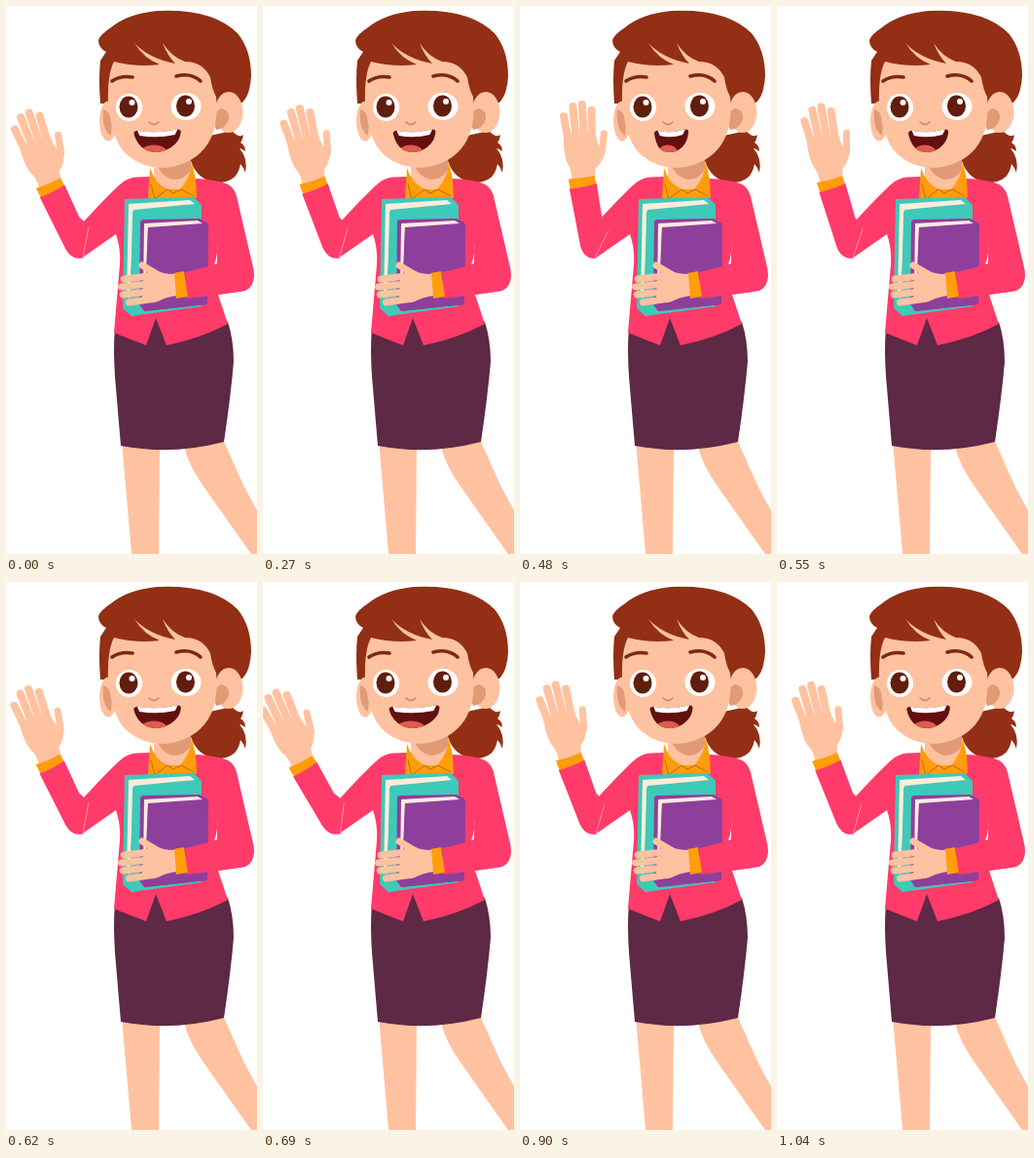
Animation of 258x562 px, one loop 1110 ms. Source, as an HTML page:

```html
<!DOCTYPE html>
<html lang="en">
<head>
<meta charset="utf-8">
<title>Waving teacher</title>
<style>
  html, body { margin: 0; width: 100%; height: 100%; overflow: hidden; background: #fff; }
  svg { display: block; width: 258px; height: 562px; }
  .skin { fill: #ffc2a0; }
  .hair { fill: #922f14; }
  .pink { fill: #ff3b6a; }
  .orange { fill: #ff9d0a; }
  .teal { fill: #3fc9b8; }
  .purple { fill: #8e3f9c; }
  .skirt { fill: #5d2945; }
  .page { fill: #fdecdc; }
  .shade { fill: #e09a75; }
  .dark { fill: #640f10; }
  .line { fill: none; stroke-linecap: round; stroke-linejoin: round; }
  .finger { stroke: #ffc2a0; stroke-width: 7; }
  .fold { stroke: #ff9fb4; stroke-width: .8; }
  .gap { stroke: #e6a07c; stroke-width: .8; }
  .brow { stroke: #7c2812; stroke-width: 3.6; }
</style>
</head>
<body>
<svg viewBox="0 0 258 562">
  <!-- legs and skirt -->
  <path class="skin" d="M119 446L129 562H157L158 450ZM183 452Q188 472 204 494L252 562H258V517Q246 497 238 478L222 442Z"/>
  <path class="skirt" d="M112 330Q110 350 112 380L118 451Q170 461 224 447Q231 400 234 365Q234 342 228 324L154 316Z"/>

  <!-- ponytail, neck -->
  <path class="hair" d="M196 136L232 128Q240 136 244 132Q243 138 241 140Q246 143 246 149Q242 146 240 146Q249 156 246 171Q244 165 241 162Q238 181 218 181Q196 180 189 156Z"/>
  <path class="skin" d="M152 160H191V190H152Z"/>
  <path class="shade" d="M156 158L190 150V168Q184 178 172 178Q160 175 156 164Z"/>

  <!-- jacket -->
  <path class="pink" d="M80 221Q102 197 116 184Q124 176 134 175.500L147 175L172 196L194 177Q219 178 230 184Q235 188 237 195L254 268Q258 286 246 292L218 296L228 326Q200 341 165 348L154 320L144 348Q128 342 111 335L117 265Q118 248 113 234L77 259L70 240Z"/>
  <path fill="#fff" d="M217 243Q218 255 214 265L217 264Z"/>

  <!-- collar -->
  <path class="orange" d="M148 166L146 197L154 200H190L196 196L195 178L191 160Q190 176 179 188H166Q153 182 148 166Z"/>
  <path class="line" stroke="#bd6a0b" d="M149 183L153 198L166 188L172 192L180 188L193 195"/>

  <!-- head -->
  <path class="hair" d="M97 100Q95 75 97 56L103 47Q95 43 95 35Q97 29 108 22Q125 8 155 5Q212 2 238 28Q252 45 252 72Q251 90 244 98L225 110L110 100Z"/>
  <ellipse class="skin" cx="105" cy="118" rx="9" ry="20.500"/>
  <ellipse class="skin" cx="229" cy="109" rx="14.500" ry="21"/>
  <path class="shade" d="M214 122Q214 106 222 105Q230 107 229 116Q226 126 216 127Z"/>
  <path class="shade" d="M100 106Q107 108 109 118L108 133Q98 126 100 106Z"/>
  <path class="skin" d="M105 100Q104 70 111 57Q134 63 158 60Q142 54 132 38Q147 54 174 59Q166 51 161 38Q170 52 184 57Q202 57 210 73Q212 86 216 93Q219 124 207 142Q195 160 170 165Q145 169 126 154Q109 141 105 100Z"/>
  <path class="line brow" d="M109 77Q118 71 130 73M175 72Q190 68 200 77"/>
  <g id="eyes"></g>
  <path class="line" stroke="#c98560" stroke-width="1.400" d="M147 119Q152 124 157 119"/>

  <clipPath id="lips"><path id="lipShape"/></clipPath>
  <g clip-path="url(#lips)">
    <rect class="dark" x="125" y="120" width="65" height="35"/>
    <ellipse id="tongue" fill="#e25a4e" cx="152" cy="149.500" ry="7"/>
    <path id="teeth" fill="#fff"/>
  </g>

  <!-- books -->
  <path class="teal" d="M122 198L193 196L201 204V300L129 318L120 310Z"/>
  <path class="page" d="M126 203L189 199L194 203L131 209L127 300L124 298Z"/>
  <path class="teal" d="M130 211L201 204V308L128 318Z"/>
  <path class="purple" d="M138 222Q138 219 142 219L199 218L208 223L207 306L142 313L137 306Z"/>
  <path class="page" d="M142 223L197 220L202 223L146 227L144 290H141Z"/>
  <path class="purple" d="M146 228L208 223L207 306L142 313Z"/>

  <!-- arm holding the books -->
  <path class="pink" d="M184 273L217 265L250 264L251 288Q248 292 240 293L186 300Z"/>
  <path class="orange" d="M172 274L183 272L187 298L175 300Z"/>
  <g id="holdingFingers"></g>
  <path class="line finger" d="M140 266L157 276"/>
  <path class="skin" d="M141 276L150 270Q162 275 173 275L175 297Q163 299 156 303Q148 306 140 302Z"/>

  <!-- waving arm -->
  <g id="arm">
    <g id="wavingFingers"></g>
    <path class="line finger" d="M88.500 131L86 150"/>
    <path class="skin" d="M47 130L80 131Q81 141 84 146L90 146Q88 159 79 167L78 178H54Q55 168 50 160Q46 150 47 130Z"/>
    <path class="orange" d="M51 177Q65 177 78 174L80 184L53 188Z"/>
    <path class="pink" d="M52 187Q67 186 80 182L85 218L92 230L77 259Q65 259 62 245Z"/>
    <path class="line fold" d="M91 231L77 258"/>
  </g>
</svg>

<script>
const byId = id => document.getElementById(id);
const repeat = (id, count, draw) => {
  byId(id).innerHTML = Array.from({ length: count }, (_, i) => draw(i)).join("");
};

// Fingertips lie on a shallow arc, so each hand is one rule.
repeat("wavingFingers", 4, i =>
  `<path class="line finger" style="stroke-width:8"
    d="M${47.5 + 9.5 * i} ${100.5 + 4 * (i - 1.75) ** 2}L${52 + 8 * i} 140"/>`);
repeat("holdingFingers", 4, i => {
  const x = 118.5 + 2.2 * (i - 1.1) ** 2, y = 280 + 8 * i;
  return `<path class="line finger" d="M${x} ${y}L147 ${y - 3}"/>`;
});
repeat("eyes", 2, i => {
  const x = 126.5 + 58.5 * i, y = 104 - i;
  return `<ellipse cx="${x}" cy="${y}" rx="${13.5 + 2 * i}" ry="14" fill="#fff"/>
    <ellipse cx="${x - .5}" cy="${y - .5}" rx="9.5" ry="11" fill="#611d0d"/>
    <circle cx="${x + 3}" cy="${y - 5}" r="3" fill="#fff"/>`;
});

const LOOP = 1110, HOLD = 270, STEP = 70;
// Turning points of the wave: step and arm angle in degrees
const turns = [[-1, -19], [3.5, 0], [7, -21], [11, -10], [14, -19]];

function armAngle(step) {
  const next = turns.findIndex(([at]) => at > step);
  const [from, a] = turns[next - 1], [to, b] = turns[next];
  const ease = (1 - Math.cos(Math.PI * (step - from) / (to - from))) / 2;
  return a + (b - a) * ease;
}

function render(time) {
  const t = time % LOOP;
  const step = t < HOLD ? 0 : 1 + Math.floor((t - HOLD) / STEP);
  const angle = armAngle(step);
  // The smile widens as the arm swings outwards.
  const mid = 155.5, width = 34.5 - .83 * angle;
  const left = mid - width / 2, right = mid + width / 2;

  byId("arm").setAttribute("transform", `rotate(${angle} 75 250)`);
  byId("lipShape").setAttribute("d",
    `M${left} 130Q${left + 2} 127 ${left + 5} 128Q${mid} 131 ${right - 4} 126.5Q${right} 126 ${right} 129` +
    `C${right - 1} 143 ${mid + 8} 150 ${mid - 2} 150C${mid - 13} 150 ${left + 2} 141 ${left} 130Z`);
  byId("teeth").setAttribute("d",
    `M${left + 3} 126H${right - 3}L${right - 6} 132Q${mid} 136 ${left + 6} 133Z`);
  byId("tongue").setAttribute("rx", width * .27);
}

const start = performance.now();
function tick() {
  render(performance.now() - start);
  requestAnimationFrame(tick);
}
tick();
</script>
</body>
</html>
```
